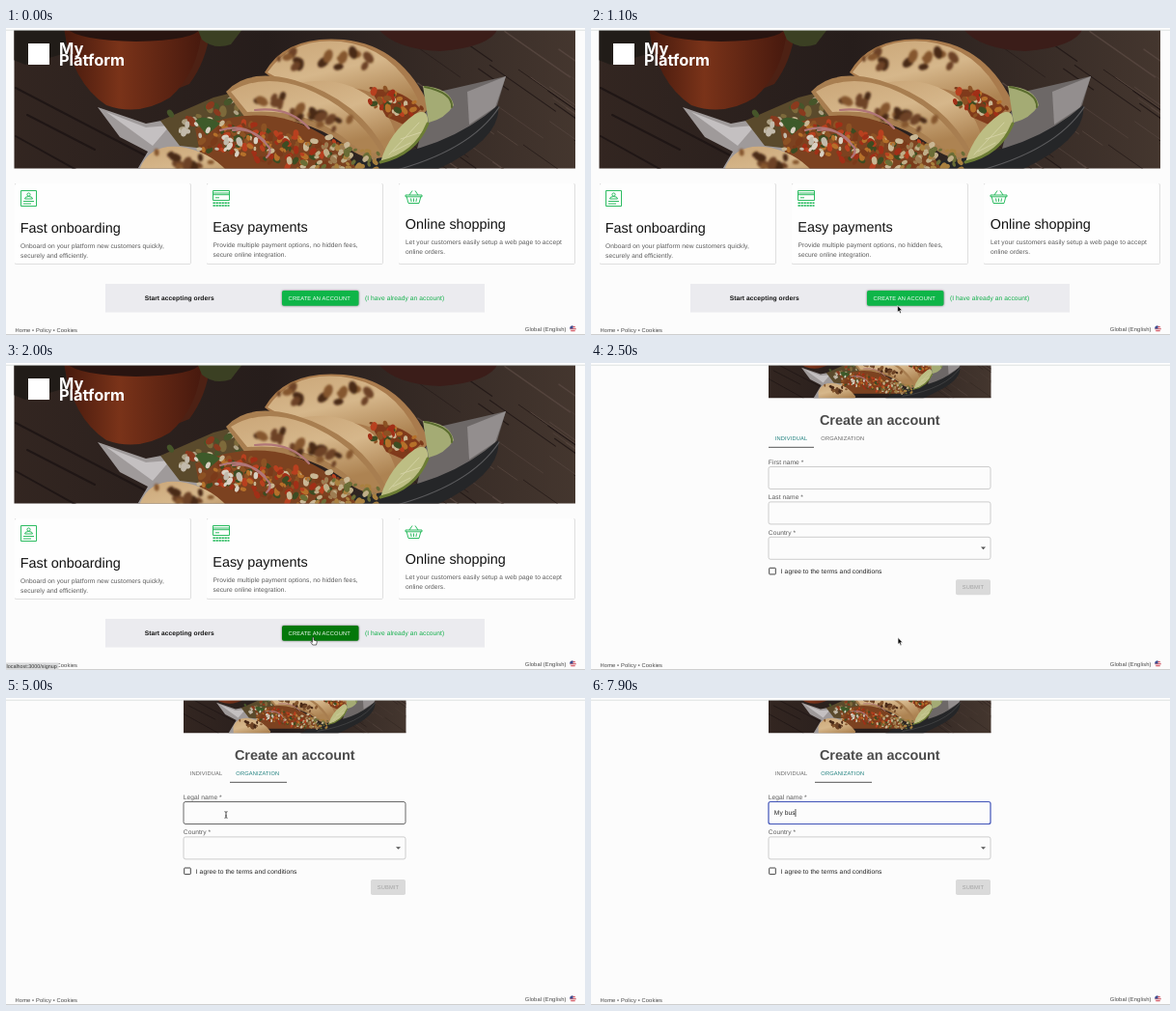
An HTML page for the animation above (8000 ms loop, 600 by 318 pixels).

```html
<!DOCTYPE html>
<html lang="en">
<head>
<meta charset="utf-8">
<title>Sign-up walkthrough</title>
<style>
html, body { margin: 0; width: 100%; height: 100%; overflow: hidden; background: #fcfcfc; }
svg { display: block; width: 100%; height: 100%; }
text { font-family: "Liberation Sans", Arial, sans-serif; font-size: 6.65px; letter-spacing: .01em; fill: #5a5a5a; text-rendering: geometricPrecision; white-space: pre; }
.logo { font: 700 16.4px Inter, sans-serif; letter-spacing: 0; fill: #fff; }
.head { font-size: 14.4px; letter-spacing: 0; fill: #111; }
.title { font-size: 14.4px; font-weight: 700; letter-spacing: 0; fill: #4c4c4c; text-anchor: middle; }
.caps { font-size: 5.72px; letter-spacing: .0286em; }
.foot { font-size: 5.75px; letter-spacing: .02em; fill: #444; }
.dark { fill: #222; }
.bold { font-weight: 700; fill: #111; }
.green { fill: #12b04a; }
.card { fill: #fefefe; filter: drop-shadow(0 .9px .6px #0007); }
.icon { fill: none; stroke: #17b551; stroke-width: .9; }
.field { fill: #fcfcfc; }
.hidden { display: none; }
</style>
</head>
<body>
<script>
const LOOP = 8000;

let seed = 11;
const rand = () => {
  seed = (seed * 16807) % 2147483647;
  return seed / 2147483647;
};
const label = (x, y, str, cls = '') => `<text x="${x}" y="${y}" class="${cls}">${str}</text>`;
const box = (x, y, w, h, attrs) => `<rect x="${x}" y="${y}" width="${w}" height="${h}" ${attrs}/>`;
const shape = (d, fill, attrs = '') => `<path d="${d}" fill="${fill}" ${attrs}/>`;
const line = (d, color, width) => shape(d, 'none', `stroke="${color}" stroke-width="${width}" stroke-linecap="round"`);

// Irregular blobs spread along the segment (x0,y0)-(x1,y1).
function scatter(n, colors, size, spread, x0, y0, x1, y1) {
  let out = '';
  for (let i = 0; i < n; i++) {
    const u = rand();
    const x = x0 + (x1 - x0) * u + (rand() - .5) * spread;
    const y = y0 + (y1 - y0) * u + (rand() - .5) * spread;
    const r = size * (.5 + rand() * .7);
    out += `<ellipse rx="${r}" ry="${r * .65}" fill="${colors[i % colors.length]}" transform="translate(${x} ${y}) rotate(${rand() * 180})"/>`;
  }
  return out;
}

const charred = (n, size, spread, ...segment) =>
  `<g filter="url(#smoky)">${scatter(n, ['#4a2a17', '#6d4325', '#85572f'], size, spread, ...segment)}</g>`;

function photo() {
  const salad = ['#a12f17', '#b5702a', '#3d4c22', '#c9b794', '#7a3a1a', '#b8401f', '#8c5224'];
  let planks = '';
  for (let i = 0; i < 30; i++) {
    const x = 400 + rand() * 190, y = rand() * 150, len = 20 + rand() * 50;
    planks += line(`M${x} ${y}l${len} ${len * .7}`, i % 2 ? '#54443d' : '#241a18', .5 + rand());
  }
  return `<g id="photo"><rect x="0" y="0" width="600" height="170" fill="url(#wood)"/>
    <g filter="url(#soft)">${planks}
    ${line('M10 62L150 135M10 112L100 162M22 90L92 126', '#1f1615', 2)}
    ${shape('M0 0H62V26L20 38L0 30Z', '#211c18')}
    ${shape('M158 0H212Q208 34 190 58L160 70Z', '#4d2114')}
    ${shape('M60 0H203Q200 45 170 72Q138 92 104 80Q68 56 60 0Z', 'url(#clay)')}
    ${shape('M62 0H202Q196 13 135 14Q75 13 62 0Z', '#281410')}
    ${shape('M198 0H246L233 17Q216 23 203 12Z', '#3b4023')}
    ${shape('M385 0H510Q502 20 450 24Q402 22 385 0Z', '#3b1d19')}
    ${shape('M95 82L145 99L182 92L235 70L255 125L190 165H125L147 128L118 113Z', '#9f9a9a')}
    ${shape('M104 87L145 103L170 101L152 122Z', '#c4c0c1')}
    ${shape('M440 68L518 50L509 80L470 122L420 150Z', '#6d6867')}
    ${shape('M478 66L518 50L507 82L480 100Z', '#938e8e')}
    ${shape('M370 135Q455 128 510 80Q514 114 448 146L400 170H300Z', '#252628')}
    ${line('M360 157Q475 137 511 82', '#5b5b5d', 1.2)}
    ${shape('M160 96L215 72L262 60L300 90L250 130L180 122Z', '#5a4a2c')}
    ${scatter(22, ['#46552a', '#7d6a3b', '#8a3a1e', '#ada184'], 5, 20, 180, 98, 240, 80)}
    ${shape('M268 46Q290 7 350 12Q411 18 439 82L424 98L398 118Q365 70 300 70Z', '#a97b4d')}
    ${shape('M271 46Q296 9 347 14Q401 20 427 74L412 88Q378 52 300 62Z', 'url(#dough)')}
    ${charred(15, 6, 16, 290, 32, 385, 33)}
    ${shape('M300 58Q350 46 385 78Q402 96 405 116L392 130Q365 90 315 76Z', 'url(#dough)')}
    ${shape('M378 64Q408 60 430 84L412 100L394 92Z', '#803a1b')}
    ${scatter(45, salad, 4, 20, 380, 70, 424, 87)}
    ${shape('M432 60Q460 62 464 80Q455 94 438 98Z', '#a4ab74')}
    ${line('M434 61Q463 67 462 82', '#5a6c2e', 2)}
    ${shape('M228 66Q250 41 299 54Q367 74 396 132Q380 140 360 128Q316 90 248 93Z', '#a87e50')}
    ${shape('M233 66Q266 46 309 62Q360 82 388 128Q375 133 358 120Q315 82 250 87Z', 'url(#dough)')}
    ${charred(20, 6.5, 18, 255, 69, 350, 104)}
    ${shape('M196 104Q250 82 296 96Q345 112 366 150H205Z', '#7c4220')}
    ${scatter(170, salad, 4, 36, 212, 110, 335, 134)}
    ${scatter(60, ['#bfae88', '#a9803f', '#6a6d36', '#9d7d52'], 4, 26, 320, 130, 378, 140)}
    ${shape('M139 145Q149 120 180 123Q216 128 237 158L230 170H140Z', 'url(#dough)')}
    ${charred(12, 6, 15, 160, 136, 218, 144)}
    ${line('M222 106Q251 96 273 124Q275 130 270 134M258 85Q294 81 314 104M235 106Q254 103 268 117', '#b07678', 2.2)}
    ${shape('M388 139Q397 108 424 89Q439 82 437 101Q422 130 388 139Z', '#bdbe84')}
    ${line('M388 139Q424 131 437 99', '#6c7d34', 3)}
    ${line('M397 131L428 98M401 128L419 119M409 115L430 108', '#d8d6aa', .8)}
    ${shape('M196 96Q205 88 222 99L208 111Z', '#3d5a2a')}
    ${scatter(16, ['#d8d0c2', '#c2baab'], 4, 20, 172, 104, 250, 126)}
    </g></g>`;
}

const icons = `
  <g class="icon"><path d="M15.500 168.500h16v16h-16zM18 179.500h11M18 182h8M19.500 177q0-2.500 4-2.500t4 2.500z"/><circle cx="23.500" cy="172.500" r="1.600"/></g>
  <g class="icon"><path d="M214.500 168.500h17v10h-17zM214.500 171h17M214.500 172.700h17M217 175.800h4"/><path d="M214.500 181.200h17M214.500 184h17" stroke-width="1.500" stroke-dasharray="2.300 .7"/></g>
  <g class="icon" stroke-width=".8"><path d="M414 173h17v1.800h-17zM415.200 174.800l1.800 6.700h11l1.800-6.700M418 173l3-4.500M427 173l-3-4.500M419.500 176.500l.6 3.500M422.500 176.500v3.500M425.500 176.500l-.6 3.500"/></g>`;

const landing = `<g id="landing">
  <g clip-path="url(#heroClip)"><use href="#photo"/></g>
  ${box(23, 16, 22, 22, 'fill="#fff"')}
  ${label(55, 26.5, 'My', 'logo')}${label(55, 39, 'Platform', 'logo')}
  ${[9, 208, 407].map(x => box(x, 161, 182.5, 83.5, 'rx="1.500" class="card"')).join('')}
  ${icons}
  ${label(14.8, 211.5, 'Fast onboarding', 'head')}
  ${label(15, 228, 'Onboard on your platform new customers quickly,')}
  ${label(15, 238, 'securely and efficiently.')}
  ${label(214.3, 210.5, 'Easy payments', 'head')}
  ${label(214.5, 227, 'Provide multiple payment options, no hidden fees,')}
  ${label(214.5, 237, 'secure online integration.')}
  ${label(413.8, 207.8, 'Online shopping', 'head')}
  ${label(414, 224.3, 'Let your customers easily setup a web page to accept')}
  ${label(414, 234.3, 'online orders.')}
  ${box(103, 265, 393, 29.500, 'fill="#ebebef"')}
  ${label(143.7, 282.2, 'Start accepting orders', 'bold')}
  ${box(286, 272, 79.500, 15.700, 'id="cta" rx="1.800" style="filter:drop-shadow(0 .8px .8px #0008)"')}
  ${label(292.6, 282, 'CREATE AN ACCOUNT', 'caps" style="fill:#fff')}
  ${label(372, 282.2, '(I have already an account)', 'green')}
</g>`;

const field = y => box(184, y, 230, 23, 'rx="2" class="field"');
const select = y => field(y) + shape(`M404 ${y + 10.3}h5l-2.500 2.600z`, '#555');
const agreement = y => box(184.700, y, 6.600, 6.600, 'rx=".6" fill="none" stroke="#444" stroke-width="1"')
  + label(196.8, y + 5.8, 'I agree to the terms and conditions', 'dark')
  + box(378, y + 12, 36, 16, 'rx="1.800" fill="#dadada"')
  + label(384.7, y + 22, 'SUBMIT', 'caps" style="fill:#a2a2a2');

const signup = `<g id="signup">
  <g clip-path="url(#bannerClip)"><use href="#photo" transform="translate(184 15) scale(.396) translate(-9 -108)"/></g>
  ${label(299.3, 63.5, 'Create an account', 'title')}
  ${label(190.7, 79.6, 'INDIVIDUAL', 'caps" id="tabA')}
  ${label(238.3, 79.6, 'ORGANIZATION', 'caps" id="tabB')}
  ${box(184, 86.800, 47, 1, 'id="ink" fill="#555"')}
  <g id="individual">
    ${label(183.8, 105, 'First name *')}${field(107.5)}
    ${label(183.8, 141.3, 'Last name *')}${field(143.9)}
    ${label(183.8, 177.6, 'Country *')}${select(180.3)}
    ${agreement(212.3)}
  </g>
  <g id="organization">
    ${label(183.8, 105, 'Legal name *')}${field(107.5)}
    ${label(183.8, 141.3, 'Country *')}${select(143.9)}
    ${agreement(176)}
    ${label(189.8, 121.4, '', 'dark" id="typed')}
    ${box(190, 115, .7, 8, 'id="caret" fill="#111"')}
  </g>
</g>`;

const chrome = `
  ${box(0, 0, 600, 2, 'fill="#fff"')}${box(0, 1.7, 600, .9, 'fill="#d9dedd"')}
  ${box(0, 317, 600, 1, 'fill="#cfcfcf"')}
  ${label(9.6, 314.700, 'Home • Policy • Cookies', 'foot')}
  ${label(537.8, 313.700, 'Global (English)', 'foot')}
  <circle cx="587.500" cy="311.500" r="3.300" fill="#f3e6e6"/>
  ${line('M586 309.600h3.400M585 311.700h5.300M585.700 313.700h3.600', '#d0384a', .9)}
  ${shape('M587.500 308.200a3.300 3.300 0 0 0-3.300 3.300h3.300z', '#3c4f92')}
  <g id="status">${box(0, 310.500, 54.500, 7.500, 'fill="#d9dadb"')}
  ${label(.5, 316.300, 'localhost:3000/signup', 'foot" style="font-size:5.400px;letter-spacing:0;fill:#333')}</g>`;

const pointers = `<g id="pointer">
  <path id="arrow" d="M0 0V6.800L1.500 5.400L2.600 7.900L3.700 7.400L2.600 5H4.700Z" fill="#000" stroke="#fff" stroke-width=".5"/>
  <path id="hand" d="M-.7 0Q0-.8.7 0V2.600L3.400 3.400Q4.200 3.800 3.800 5L3.200 7.500H-.6L-2.500 4.700Q-2.400 3.700-1.500 4.200L-.7 4.800Z" fill="#fff" stroke="#111" stroke-width=".6"/>
  <path id="beam" d="M-1.500-3.300Q0-3.300 0-2.500Q0-3.300 1.500-3.300M0-2.500V2.500M-1.500 3.300Q0 3.300 0 2.500Q0 3.300 1.500 3.300M-.7.900H.7" fill="none" stroke="#222" stroke-width=".8"/>
</g>`;

document.body.insertAdjacentHTML('afterbegin', `<svg viewBox="0 0 600 318">
  <defs>
    <linearGradient id="wood"><stop stop-color="#332621"/><stop offset=".45" stop-color="#261d1b"/><stop offset="1" stop-color="#45372f"/></linearGradient>
    <linearGradient id="clay"><stop stop-color="#45190d"/><stop offset=".4" stop-color="#7a3319"/><stop offset="1" stop-color="#47190e"/></linearGradient>
    <linearGradient id="dough" x2=".5" y2="1"><stop stop-color="#caa678"/><stop offset=".5" stop-color="#d6b78b"/><stop offset="1" stop-color="#ad8352"/></linearGradient>
    <filter id="soft"><feGaussianBlur stdDeviation=".7"/></filter>
    <filter id="smoky"><feGaussianBlur stdDeviation="1.3"/></filter>
    <clipPath id="heroClip"><rect x="8.500" y="2" width="581.500" height="143.500"/></clipPath>
    <clipPath id="bannerClip"><rect x="184" y="2" width="230.500" height="34.300"/></clipPath>
    ${photo()}
  </defs>
  <rect width="600" height="318" fill="#fcfcfc"/>${landing}${signup}${chrome}${pointers}</svg>`);

// Pointer stops: time, x, y
const path = [[800, 324, 300], [1050, 317.7, 287.5], [1250, 317.7, 287.5], [1350, 318.5, 284.5], [3100, 318, 284.5],
  [3600, 262, 79], [4100, 262, 79], [4700, 228, 121], [LOOP, 228, 121]];
const keys = [[5900, 'M'], [6900, 'My'], [7100, 'My '], [7300, 'My b'], [7500, 'My bu'], [7700, 'My bus']];
const HOVER = 1300, OPEN = 2250, SWITCH = 3750, FOCUS = 5400;

const $ = id => document.getElementById(id);
const show = (id, on) => $(id).classList.toggle('hidden', !on);
const ramp = (t, from, ms) => Math.min(1, Math.max(0, (t - from) / ms));
const ease = u => u * u * (3 - 2 * u);
const mix = (a, b, u) => a + (b - a) * u;

function pointerAt(t) {
  const i = Math.max(1, path.findIndex(stop => stop[0] > t));
  const [t0, x0, y0] = path[i - 1], [t1, x1, y1] = path[i];
  const u = ease(ramp(t, t0, t1 - t0));
  return [mix(x0, x1, u), mix(y0, y1, u)];
}

function render(t) {
  const form = t >= OPEN, org = t >= SWITCH, focused = t >= FOCUS;
  const [x, y] = pointerAt(t);
  show('landing', !form);
  show('signup', form);
  show('individual', !org);
  show('organization', org);
  show('status', t >= HOVER + 100 && t < OPEN + 100);

  const h = ramp(t, HOVER, 200);
  $('cta').style.fill = `rgb(${mix(14, 3, h)},${mix(181, 120, h)},${mix(72, 10, h)})`;
  $('tabA').style.fill = org ? '#666' : '#1d7f7d';
  $('tabB').style.fill = org ? '#1d7f7d' : '#666';
  const slide = ease(ramp(t, SWITCH, 300));
  $('ink').setAttribute('x', mix(184, 232, slide));
  $('ink').setAttribute('width', mix(47, 59, slide));

  let kind = (!form && t >= HOVER) || (form && y > 70 && y < 88) ? 'hand' : 'arrow';
  const group = $(org ? 'organization' : 'individual');
  group.querySelectorAll('.field').forEach((f, i, all) => {
    const top = +f.getAttribute('y');
    const over = form && y > top && y < top + 23;
    const active = org && focused && i === 0;
    if (over) kind = i === all.length - 1 ? 'hand' : 'beam';
    f.style.stroke = active ? '#4053b8' : over ? '#444' : '#c2c2c2';
    f.style.strokeWidth = active ? 1.2 : .8;
  });

  const pressed = keys.filter(k => k[0] <= t);
  const [last, text] = pressed.length ? pressed[pressed.length - 1] : [FOCUS, ''];
  if ($('typed').textContent !== text) $('typed').textContent = text;
  show('caret', focused && (t - last) % 1000 < 500);
  $('caret').setAttribute('x', 189.8 + (text && org ? $('typed').getComputedTextLength() : 0));

  show('pointer', t >= path[0][0] && t < keys[0][0]);
  for (const k of ['arrow', 'hand', 'beam']) show(k, k === kind);
  $('pointer').setAttribute('transform', `translate(${x} ${y})`);
}

const start = performance.now();
(function tick() {
  render((performance.now() - start) % LOOP);
  requestAnimationFrame(tick);
})();
</script>
</body>
</html>
```
